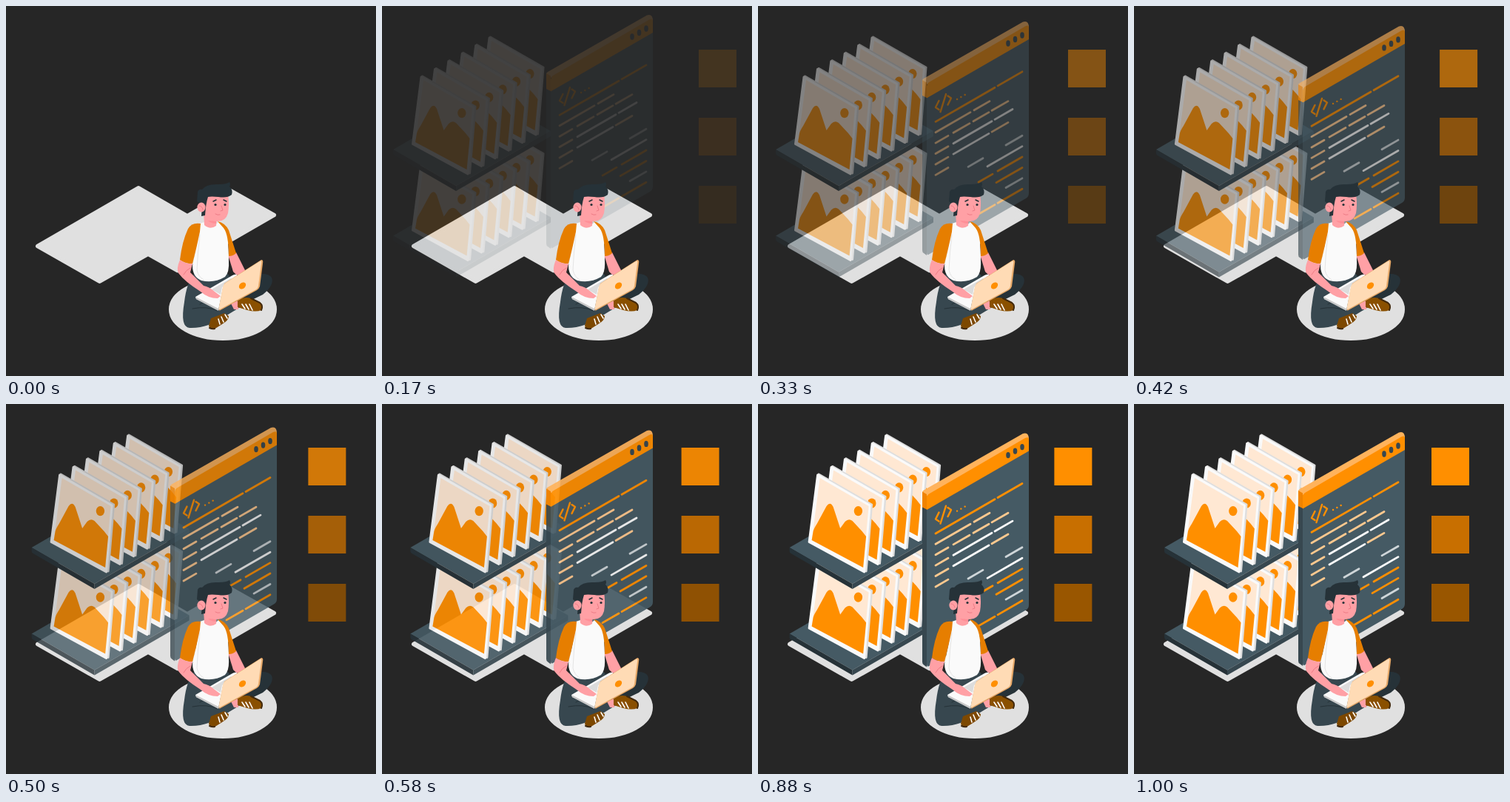
An HTML page for the animation above (1.04 s loop, 500 px wide and 500 px high).

```html
<!DOCTYPE html>
<html lang="en">
<head>
<meta charset="utf-8">
<title>Developer at work</title>
<style>
  html, body { margin: 0; height: 100%; overflow: hidden; background: #262626; }
  svg { display: block; width: 100vw; height: 100vh; }
  .line { fill: none; stroke-linecap: round; stroke-linejoin: round; }
  .soft { stroke-width: 3; stroke-linejoin: round; }
</style>
</head>
<body>
<svg viewBox="0 0 500 500">
  <defs>
    <g id="shelf">
      <path fill="#455a64" d="M41 194 169 120 254 169 126 243Z"/>
      <path fill="#263238" d="M41 194 126 243V250L43 202Q41 201 41 199Z"/>
      <path fill="#37474f" d="M126 243 254 169V176L126 250Z"/>
    </g>
    <g id="card">
      <path class="soft" fill="#dedede" stroke="#dedede" d="M80.500 95 152 136 144.500 226 69 185Z"/>
      <path class="soft" fill="#fafafa" stroke="#fafafa" d="M79 96 149.500 137 142 227 67.500 186.500Z"/>
      <path fill="#ffe8d3" d="M82 100 148 138 140.500 221 71 184Z"/>
      <path fill="#ff8f00" d="M71 184 73 172Q74 168 78 162L91 138Q96 131 100 139L109.500 168 116 159Q121 154 126 158L139 172 144.500 179 140.500 221Z"/>
      <ellipse cx="133.800" cy="144.600" rx="5.700" ry="6.600" fill="#ff8f00"/>
    </g>
  </defs>

  <g fill="#e0e0e0" stroke="#e0e0e0" stroke-width="6" stroke-linejoin="round">
    <path d="M43 324.500 179 246 245 284 304 250 362 282.500 232 357.500 192 335 126.500 372Z"/>
    <ellipse cx="293" cy="410" rx="70" ry="39"/>
  </g>

  <g id="gallery"></g>

  <g id="window">
    <path fill="#ffb35c" d="M222 118Q222 116 224 115L358 38.500Q366 36 366 46L340 62 228 123Z"/>
    <path fill="#f08300" d="M222 117 228 120.500V142L222 138.500Z"/>
    <path fill="#37474f" d="M222 138 228 141V354L224 351Q222 350 222 347Z"/>
    <path fill="#455a64" d="M228 141 366 61V270Q366 275 362 277L232 352Q228 355 228 350Z"/>
    <path fill="#ff8f00" d="M228 125Q228 122 231 120L361 44.500Q366 42 366 46V62L228 141.500Z"/>
    <g fill="#37474f">
      <ellipse cx="338" cy="67.500" rx="2.800" ry="4.200"/>
      <ellipse cx="347.500" cy="62" rx="2.800" ry="4.200"/>
      <ellipse cx="357" cy="56.500" rx="2.800" ry="4.200"/>
    </g>
    <path class="line" stroke="#ff8f00" stroke-width="2.400" d="M244.500 145 240 154 244.500 157M254 136 246.500 160M256.500 138.500 261 141.500 256.500 150.500M269 143h.1M274.300 140h.1M279.600 137h.1"/>
    <g id="code" class="line" stroke-width="2.800"></g>
  </g>

  <g id="badges">
    <rect x="402" y="59" width="51" height="51" fill="#ff8f00"/>
    <rect x="402" y="151" width="51" height="51" fill="#c86f00"/>
    <rect x="402" y="243" width="51" height="51" fill="#995600"/>
  </g>

  <g id="person">
    <path fill="#ffa0a5" d="M300 336 311 333 325 361 317 369 307 359Z"/>
    <path fill="#263238" d="M290 364 338 363Q354 360 359 367 363 377 347 390L310 408 280 390Z"/>
    <path fill="#37474f" d="M254 362Q244 374 241 400 235 434 248 435 273 436 300 417L318 406 300 362Z"/>
    <path class="line" stroke="#263238" d="M252 409Q272 405 286 412M262 403 277 395"/>
    <path fill="#ffa0a5" d="M304 402 314 398 314 410 308 410Z"/>
    <path fill="#7d4800" d="M277 422 295 415 301 419Q301 425 292 430L281 437Q275 437 274 432Z"/>
    <path fill="#8a5000" d="M313 397Q322 392 331 395L344 401Q348 405 345 411 338 414 326 411L313 407Z"/>
    <path class="line" stroke="#42290c" stroke-width="2" d="M275 435Q279 437 282 436M331 395 343 401Q348 405 345 411"/>
    <path class="line" stroke="#fff" stroke-width="1.600" d="M287 423 289 430M291 420 294 427M296 417 299 422M319 403 323 409M324 403 328 410M329 403 333 411"/>

    <path fill="#fafafa" d="M262 294 268 292Q278 302 287 292L296 298Q301 312 301 344 302 360 296 366 281 375 264 371 252 366 252 351L258 322Z"/>
    <path class="line" stroke="#e4e4e4" d="M262 309Q259 333 258 357 260 366 267 370"/>
    <path fill="#e67e00" d="M263 294Q251 292 246 301 238 318 235 343 243 349 252 348 257 329 262 305Z"/>
    <path fill="#e67e00" d="M286 291Q296 293 301 303L311 334Q307 338 301 338 301 309 294 300Z"/>

    <path fill="#ffa0a5" d="M267 278 285 285 284 297Q276 303 268 296Z"/>
    <path fill="#ff8f97" d="M271 287Q279 290 284 291V294Q274 294 271 287Z"/>
    <path fill="#ffa0a5" d="M270 255 300 254Q302 268 300 280 297 291 286 291L272 290 268 279Z"/>
    <path fill="#263238" d="M259 251Q261 247 265 248 271 240 287 241 298 241 302 238 304 241 302 244 307 248 305 255 299 260 287 258 277 257 273 258 270 267 269 283L264 284 265 270 258 264Z"/>
    <ellipse cx="264" cy="272" rx="5.600" ry="6.400" fill="#ffa0a5"/>
    <path class="line" stroke="#ed7c86" d="M261 270Q265 270 266 275M291 270 293 276 290 277M283 281Q286 283 289 282"/>
    <path class="line" stroke="#263238" stroke-width="1.500" d="M280 264 284 262M294 262 298 264"/>
    <circle cx="283" cy="268.500" r="1.600" fill="#263238"/>
    <circle cx="296" cy="268.500" r="1.600" fill="#263238"/>

    <path fill="#fafafa" d="M256 393 306 364Q312 361 313 365L294 377 287 411 257 396Z"/>
    <path fill="#dcdcdc" d="M278 383 304 368 308 370 292 380 290 390Z"/>
    <path fill="#c9c9c9" d="M256 393 287 409V412L257 396Z"/>
    <path fill="#ffa0a5" d="M235 343Q230 355 233 361 241 372 263 386 273 395 286 395L290 392 282 386Q274 379 267 378L249 360 252 348Q243 349 235 343Z"/>
    <path class="line" stroke="#ed7c86" d="M240 363Q243 357 249 354"/>
    <path fill="#e6a868" d="M295 375 345 343Q348 343 347 348L343 379Q342 382 339 384L288 412Z"/>
    <path fill="#ffdbb5" d="M293 379Q294 376 297 374L343 345Q346 343 345 348L341 378Q341 381 338 383L287 411Z"/>
    <ellipse cx="319.500" cy="378" rx="5.200" ry="3.900" transform="rotate(-42 319.500 378)" fill="#ff8f00"/>
  </g>
</svg>
<script>
const $ = id => document.getElementById(id);
const LOOP = 1040, SLOPE = 0.577, SHIFT = 30, LEAD = 22;
const ORANGE = '#ff8f00', PEACH = '#ffc98f', WHITE = '#fafafa', GREY = '#cfd6d9';

// Two shelves with six cards each, far cards first
const put = (id, x, y) => `<use href="#${id}" x="${x}" y="${y}"/>`;
let shelves = '';
for (const y of [116.5, 0]) {
  shelves += put('shelf', 0, y);
  for (let i = 5; i >= 0; i--) shelves += put('card', i * 18.4, y - i * 10.6);
}
$('gallery').innerHTML = shelves;

// Code lines: row, colour, then start and end x of each piece
const rows = [
  [0, ORANGE, 240, 320, 324, 357],
  [1, PEACH, 240, 287, 292, 313],
  [2, PEACH, 240, 257, 264, 286, 291, 312, 316, 338],
  [3, PEACH, 240, 257],
  [3, WHITE, 264, 316, 320, 344],
  [4, PEACH, 240, 257, 316, 338],
  [4, WHITE, 264, 312],
  [5, PEACH, 240, 257],
  [6, GREY, 284, 304, 335, 357],
  [7, WHITE, 310, 357],
  [8, ORANGE, 298, 317, 324, 357],
  [9, ORANGE, 322, 357],
  [10, GREY, 335, 357],
  [11, ORANGE, 298, 320, 324, 357]
];
$('code').innerHTML = rows.map(([row, color, ...xs]) => {
  const point = x => `${x} ${311.8 + row * 14.4 - x * SLOPE}`;
  const d = xs.map((x, i) => (i % 2 ? 'L' : 'M') + point(x)).join('');
  return `<path stroke="${color}" d="${d}"/>`;
}).join('');

const bezier = (a, b, s) => 3 * (1 - s) * s * ((1 - s) * a + s * b) + s ** 3;

// cubic-bezier(.36, -.01, .5, 1.38)
function ease(x) {
  let lo = 0, hi = 1;
  for (let i = 0; i < 24; i++) {
    const mid = (lo + hi) / 2;
    if (bezier(0.36, 0.5, mid) < x) lo = mid; else hi = mid;
  }
  return bezier(-0.01, 1.38, hi);
}

function slide(id, dx, dy, p) {
  const g = $(id), rest = SHIFT * (1 - p);
  g.setAttribute('transform', `translate(${dx * rest} ${dy * rest})`);
  g.setAttribute('opacity', Math.max(0, Math.min(1, p)));
}

function draw(now) {
  const t = now % LOOP;
  const p = ease(Math.min(1, (t + LEAD) / 1000));
  slide('gallery', -1, 0, p);
  slide('window', 0, -1, p);
  slide('badges', 1, 0, p);
}

const start = performance.now();
function tick() {
  draw(performance.now() - start);
  requestAnimationFrame(tick);
}
tick();
</script>
</body>
</html>
```
